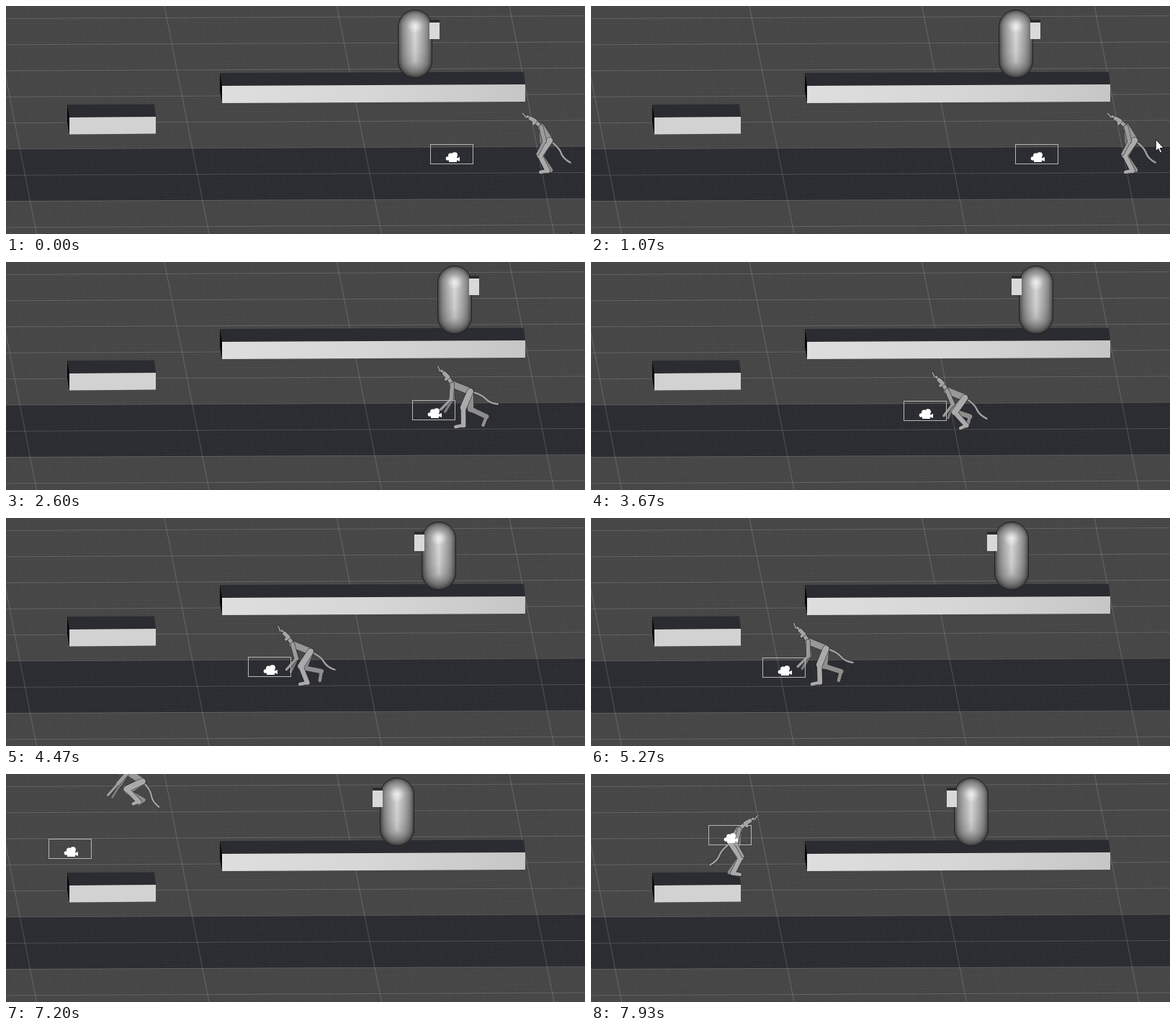
Recreate the animation shown at these times as an HTML page with a canvas. Size 804x317 px, loop 8000 ms.

```html
<!DOCTYPE html>
<html lang="en">
<head>
<meta charset="utf-8">
<title>Platform scene</title>
<style>
html, body { margin: 0; width: 100%; height: 100%; overflow: hidden; background: #464646; }
canvas { display: block; }
</style>
</head>
<body>
<canvas id="stage" width="804" height="317"></canvas>
<script>
const ctx = document.getElementById('stage').getContext('2d');
const LOOP = 8000, STEP = 1000 / 15;
const RUN = 1765, JUMP = 6000, FLIP = 7480, LAND = 7860;
const FLOOR = 234, SPEED = 0.1195, STRIDE = 435;

const ramp = (t, a, b) => Math.min(1, Math.max(0, (t - a) / (b - a)));
const mix = (a, b, k) => a.map((v, i) => v + (b[i] - v) * k);
const add = ([x, y], dx, dy) => [x + dx, y + dy];

function track(keys, t) {
  let i = 0;
  while (i < keys.length - 2 && t > keys[i + 1][0]) i++;
  const [t0, ...a] = keys[i], [t1, ...b] = keys[i + 1];
  return mix(a, b, ramp(t, t0, t1));
}

function polygon(fill, ...points) {
  ctx.beginPath();
  for (let i = 0; i < points.length; i += 2) ctx.lineTo(points[i], points[i + 1]);
  ctx.closePath();
  ctx.fillStyle = fill;
  ctx.fill();
}

function line(alpha, x0, y0, x1, y1) {
  ctx.strokeStyle = `rgba(235,235,235,${alpha})`;
  ctx.lineWidth = 1;
  ctx.beginPath();
  ctx.moveTo(x0, y0);
  ctx.lineTo(x1, y1);
  ctx.stroke();
}

function withStops(gradient, colors) {
  colors.forEach((c, i) => gradient.addColorStop(i / (colors.length - 1), c));
  return gradient;
}
const linear = (x0, y0, x1, y1, ...colors) =>
  withStops(ctx.createLinearGradient(x0, y0, x1, y1), colors);
const radial = (x, y, r, ...colors) =>
  withStops(ctx.createRadialGradient(x, y, 0, x, y, r), colors);

function drawGround() {
  ctx.fillStyle = '#464646';
  ctx.fillRect(0, 0, 804, 317);
  polygon('#2b2c31', 0, 199, 804, 195, 804, 268, 0, 271);
  for (let i = -5; i < 85; i++) {
    const y = 17.5 + i * 3.63;
    line(i % 10 ? 0.025 : 0.18, 0, y, 804, y - 3.8);
  }
  for (let i = -4; i < 36; i++) {
    const x = -19.5 + i * 23.95;
    line(i % 10 ? 0.025 : 0.2, x, 0, x + 62, 317);
  }
}

// A bar seen slightly from above; x and y are the front's upper left corner.
function drawBar(x, y, width, height, rise, tilt, front) {
  polygon('#2b2c31', x - 3, y - rise, x + width - 2, y - rise - tilt + 0.5, x + width, y - tilt, x, y);
  polygon(front, x, y, x + width, y - tilt, x + width, y + height - tilt, x, y + height);
  polygon('#050505', x - 3, y - rise, x, y, x, y + height, x - 3, y + height * 0.3);
}

function drawPlatforms() {
  drawBar(300, 111, 421, 24, 18, 2, linear(300, 110, 721, 133, '#dedede', '#d6d6d6', '#c6c6c6'));
  drawBar(88, 155, 120, 23.5, 18, 1, '#d2d2d2');
}

function drawCapsule(t) {
  const turn = 3029, x = Math.round(631.8 - 0.0212 * Math.abs(t - turn));
  const shades = Array.from({ length: 11 }, (_, i) => {
    const u = i / 10, v = 218 - 105 * u - 50 * u ** 6;
    return `rgb(${v},${v},${v})`;
  });
  ctx.save();
  ctx.translate(x, 0);
  ctx.beginPath();
  ctx.roundRect(-23.5, 5.5, 47, 94.5, 23.5);
  ctx.save();
  ctx.clip();
  ctx.fillStyle = linear(-23.5, 0, 23.5, 0, ...[...shades].reverse(), ...shades.slice(1));
  ctx.fillRect(-24, 28, 48, 50);
  for (const [cy, top] of [[29, 5], [76.5, 76.5]]) {
    ctx.fillStyle = radial(0, cy, 23.5, ...shades);
    ctx.fillRect(-24, top, 48, 24);
  }
  ctx.fillStyle = linear(0, 28, 0, 100, 'rgba(0,0,0,0)', 'rgba(0,0,0,.05)', 'rgba(0,0,0,.25)');
  ctx.fillRect(-24, 28, 48, 72);
  ctx.fillStyle = radial(0, 28, 11, 'rgba(255,255,255,.6)', 'rgba(255,255,255,0)');
  ctx.fillRect(-12, 16, 24, 24);
  ctx.restore();
  ctx.strokeStyle = '#222';
  ctx.lineWidth = 1;
  ctx.stroke();
  const side = t < turn ? 20 : -34;
  ctx.fillStyle = '#2b2c31';
  ctx.fillRect(side, 19, 14, 4);
  ctx.fillStyle = '#d9d9d9';
  ctx.fillRect(side, 23, 14, 23);
  ctx.restore();
}

// Poses are relative to the ground point; neck and tail are angles, hand is relative to the shoulder.
const standing = {
  hip: [10, -47], shoulder: [-2, -66], hand: [-5, 38],
  near: [7, -5], far: [11, -6], neck: [-0.26], tail: [0.82]
};
const leaping = {
  hip: [13, -34], shoulder: [-7, -47], hand: [-28, 32],
  near: [8, -6], far: [14, -8], neck: [-0.8], tail: [1]
};

function running(phase) {
  const bob = Math.cos(phase * 2 * Math.PI), hip = [0.5 - bob, -49.5 - 4.5 * bob];
  const foot = p => [6 - 16 * Math.cos(p * Math.PI), -13 + 8 * Math.cos((p - 0.23) * Math.PI)];
  return {
    hip, shoulder: add(hip, -25, -10), hand: [-10 - 6 * bob, 35],
    near: foot(phase), far: foot(phase + 1), neck: [0], tail: [0.6 - 0.17 * bob]
  };
}

const blend = (a, b, k) =>
  Object.fromEntries(Object.keys(a).map(key => [key, mix(a[key], b[key], k)]));

function poseAt(t) {
  let pose = blend(standing, running((t - 2600) / STRIDE), ramp(t, RUN, RUN + 250));
  pose = blend(pose, leaping, ramp(t, JUMP - 50, JUMP + 250));
  return blend(pose, standing, ramp(t, 7400, 7800));
}

function placeAt(t) {
  if (t < JUMP) return [745 - SPEED * Math.max(0, t - RUN), FLOOR];
  const s = Math.min(t, LAND) - JUMP;
  const [x] = track([[JUMP, 239], [6470, 225], [FLIP, 158], [LAND, 204]], t);
  return [x, FLOOR - 0.356 * s + 0.000165 * s * s];
}

// Middle joint of two equal bones between a and b.
function bend(a, b, bone, side) {
  const dx = b[0] - a[0], dy = b[1] - a[1], d = Math.hypot(dx, dy);
  const out = side * Math.sqrt(Math.max(0, bone * bone - d * d / 4)) / d;
  return [(a[0] + b[0]) / 2 - dy * out, (a[1] + b[1]) / 2 + dx * out];
}

// Tapered chain with a dark rim.
function limb(points, from, to, shade = '#a4a4a4') {
  for (const [color, grow] of [['#262626', 1], [shade, 0]]) {
    ctx.strokeStyle = color;
    for (let i = 1; i < points.length; i++) {
      ctx.lineWidth = from + (to - from) * (i - 1) / Math.max(1, points.length - 2) + grow;
      ctx.beginPath();
      ctx.moveTo(...points[i - 1]);
      ctx.lineTo(...points[i]);
      ctx.stroke();
    }
  }
}

function drawLeg(hip, heel, shade) {
  const knee = bend(hip, heel, 24.5, 1);
  const dx = heel[0] - knee[0], dy = heel[1] - knee[1], len = Math.hypot(dx, dy);
  const toe = [heel[0] - dy / len * 11, Math.min(-3, heel[1] + dx / len * 11 + 2)];
  limb([hip, knee, heel, toe], 8.5, 4.5, shade);
}

function drawArm(shoulder, hand, shade) {
  limb([shoulder, bend(shoulder, hand, 20.5, -1), hand], 5.5, 3.5, shade);
}

function drawTail([x, y], angle) {
  const at = (r, turn) => [x + r * Math.cos(angle + turn), y + r * Math.sin(angle + turn)];
  const b = at(16, -0.2), c = at(31, 0.12);
  for (const [color, width] of [['#262626', 3.6], ['#a0a0a0', 2.5]]) {
    ctx.strokeStyle = color;
    ctx.lineWidth = width;
    ctx.beginPath();
    ctx.moveTo(x, y);
    ctx.quadraticCurveTo(...b, ...mix(b, c, 0.5));
    ctx.quadraticCurveTo(...c, ...at(42, 0));
    ctx.stroke();
  }
}

function drawHead([x, y], angle) {
  ctx.save();
  ctx.translate(x, y);
  ctx.rotate(angle);
  limb([[-20, -25], [-17, -19], [-12, -17]], 1.6, 3);
  limb([[-15, -19], [-7, -13]], 3, 3);
  limb([[-7, -11], [0, 0]], 5, 5);
  limb([[-11, -15], [-6, -10], [-9, -7]], 5.5, 4);
  ctx.restore();
}

function drawCreature(t) {
  const { hip, shoulder, hand, near, far, neck, tail } = poseAt(t);
  const reach = add(shoulder, ...hand);
  ctx.save();
  ctx.translate(...placeAt(t));
  if (t > FLIP) ctx.scale(-1, 1);
  ctx.lineCap = ctx.lineJoin = 'round';
  drawTail(hip, tail[0]);
  drawArm(shoulder, add(reach, 6, 3), '#7a7a7a');
  drawLeg(hip, far, '#8e8e8e');
  limb([shoulder, hip], 9, 9, '#989898');
  drawLeg(hip, near, '#aaaaaa');
  drawHead(shoulder, neck[0]);
  drawArm(shoulder, reach, '#9c9c9c');
  ctx.restore();
}

function drawCamera(t) {
  const [x] = track([[1900, 589], [2550, 570], [5270, 238], [6070, 151], [7500, 34], [7930, 163]], t);
  const s = Math.max(0, t - JUMP);
  const y = 192 + (589 - x) * 0.005 - 0.1257 * s + 0.0000321 * s * s;
  ctx.save();
  ctx.translate(Math.round(x), Math.round(y));
  ctx.strokeStyle = '#b6b6b6';
  ctx.lineWidth = 1;
  ctx.strokeRect(0.5, 0.5, 59, 27);
  ctx.fillStyle = '#fff';
  for (const [cx, cy, r] of [[24.5, 20, 2.8], [28.5, 16, 3.5], [34, 15.2, 4]]) {
    ctx.beginPath();
    ctx.arc(cx, cy, r, 0, 7);
    ctx.fill();
  }
  ctx.fillRect(26, 17, 11, 8);
  polygon('#fff', 36, 20, 41, 18, 41, 24, 36, 22);
  ctx.restore();
}

function drawCursor(t) {
  let spot;
  if (t < STEP) spot = [784, 314];
  else if (t > 960 && t < 1400) spot = track([[960, 806, 215], [1070, 783, 184], [1400, 806, 190]], t);
  else return;
  ctx.save();
  ctx.translate(...spot);
  polygon('#fff', 0.5, 0.5, 0.5, 17, 4.2, 13.5, 6.6, 19.2, 9, 18.2, 6.6, 12.6, 11.5, 12.4);
  ctx.strokeStyle = '#111';
  ctx.lineWidth = 1;
  ctx.stroke();
  ctx.restore();
}

function render(now) {
  const t = Math.floor((now % LOOP) / STEP + 0.1) * STEP % LOOP;
  drawGround();
  drawPlatforms();
  drawCapsule(t);
  drawCreature(t);
  drawCamera(t);
  drawCursor(t);
  requestAnimationFrame(render);
}
requestAnimationFrame(render);
</script>
</body>
</html>
```
